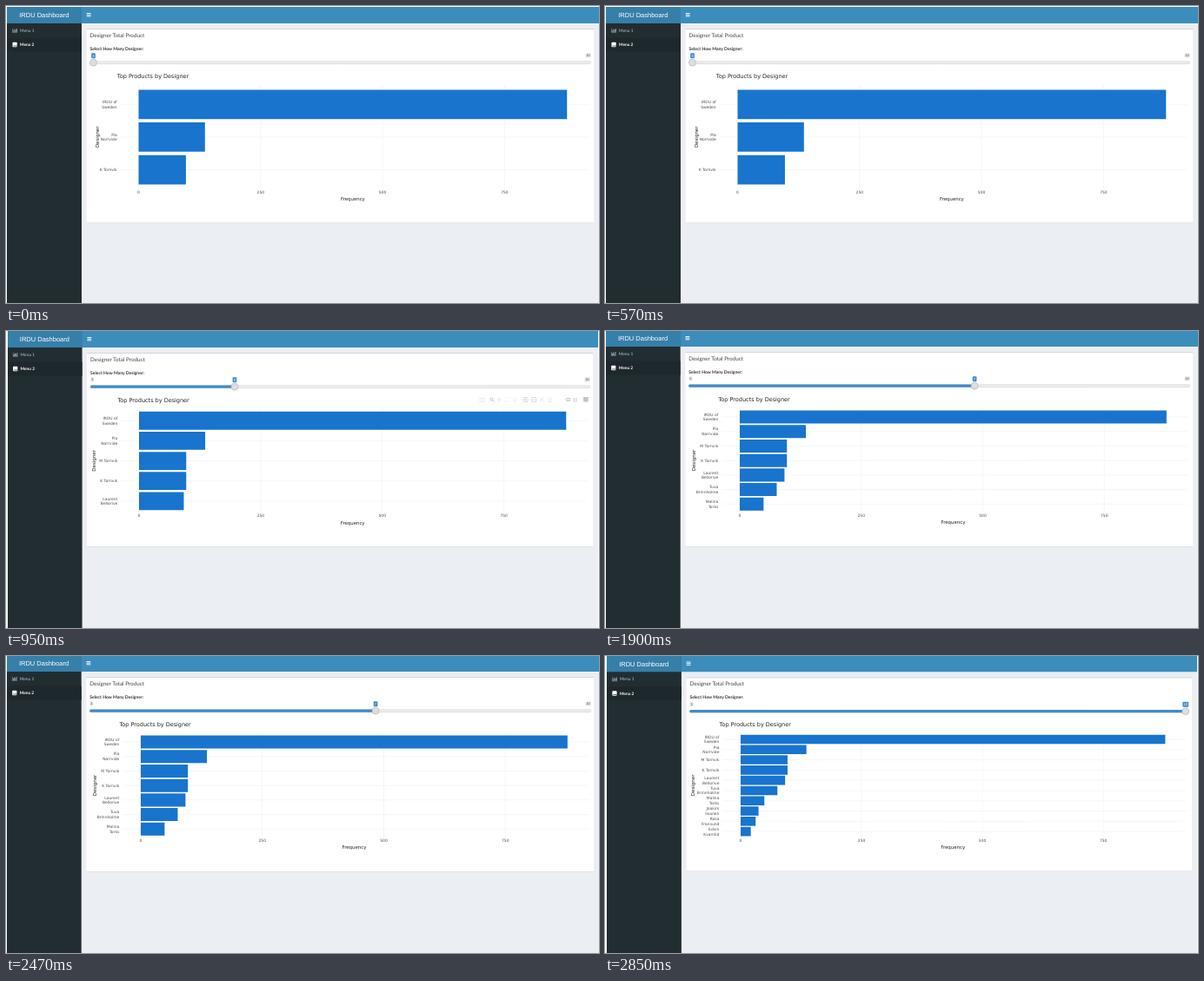
Write an HTML page with a canvas that moves like this. It is 682 by 342 pixels and loops after 3800 ms.

```html
<!DOCTYPE html>
<html lang="en">
<head>
<meta charset="utf-8">
<title>Dashboard</title>
<style>
html, body { margin: 0; width: 100%; height: 100%; overflow: hidden; background: #fff; }
canvas { display: block; width: 682px; height: 342px; }
</style>
</head>
<body>
<canvas id="stage"></canvas>
<script>
const W = 682, H = 342, STEP = 950;
const canvas = document.getElementById('stage');
const ctx = canvas.getContext('2d');
const ratio = window.devicePixelRatio || 1;
canvas.width = W * ratio;
canvas.height = H * ratio;

const UI = 'Lato, sans-serif';
const PLOT = '"DejaVu Sans", sans-serif';
const LOGO = '"Liberation Sans", Arial, sans-serif';

const designers = [
  ['IRDU of|Sweden', 878], ['Pia|Norrvide', 136], ['M Tornvik', 97], ['K Tornvik', 97],
  ['Laurent|Bellorive', 92], ['Tuva|Brinnholme', 76], ['Malina|Torks', 49],
  ['Joakim|Ilvanen', 37], ['Rosa|Fransund', 31], ['Edvin|Kvarnlid', 21]
];

// Each view is a slightly shifted screen with its own slider value n.
const views = [
  { n: 3,  left: 1, right: 682, top: 1, dx: 0,    dy: 0,    navBottom: 20,   boxBottom: 249.5, zero: 152.5, unit: .5612, plotTop: 90.8, axisX: 105 },
  { n: 5,  left: 2, right: 681, top: 0, dx: .6,   dy: -1,   navBottom: 19,   boxBottom: 248,   zero: 153,   unit: .5595, plotTop: 89.4, axisX: 101.5, tools: true },
  { n: 7,  left: 1, right: 682, top: 0, dx: -.3,  dy: -2,   navBottom: 18,   boxBottom: 248,   zero: 155,   unit: .5590, plotTop: 89,   axisX: 102.5 },
  { n: 10, left: 2, right: 681, top: 0, dx: .9,   dy: -1.5, navBottom: 18.3, boxBottom: 247.5, zero: 156,   unit: .5562, plotTop: 88.9, axisX: 101 }
];

// Toolbar icons on a 5 x 5 grid: [x, path, opacity].
const tools = [
  [545, 'M0 1h5v4H0zM2 3h1', .12],
  [556.5, 'M3.5 2a1.5 1.5 0 1 1-3 0a1.5 1.5 0 1 1 3 0M3 3l2 2', .35],
  [564.5, 'M2.5 0v5M0 2.5h5', .12],
  [573.5, 'M0 0h1M2 0h1M4 0h1M0 5h1M2 5h1M4 5h1', .12],
  [583, 'M4.5 2a2 1.5 0 1 1-4 0a2 1.5 0 1 1 4 0M1 3v2', .1],
  [595, 'M0 0h5v5H0zM2.5 1v3M1 2.5h3', .22],
  [604.5, 'M0 0h5v5H0zM1 2.5h3', .22],
  [613.5, 'M0 0l5 5M5 0l-5 5', .14],
  [623, 'M0 2.5L2.5 0L5 2.5M1 2.5V5h3V2.5', .14],
  [643.5, 'M0 2.5l1.5-1.5h3.5v3h-3.5zM2 2.5h2', .35],
  [652.5, 'M0 1h4v1.5H0zM0 3.5h4V5H0z', .18]
].map(([x, path, alpha]) => [x, new Path2D(path), alpha]);

function rect(x, y, w, h, fill, radius = 0, stroke) {
  ctx.beginPath();
  ctx.roundRect(x, y, w, h, radius);
  ctx.fillStyle = fill;
  ctx.fill();
  if (stroke) {
    ctx.strokeStyle = stroke;
    ctx.lineWidth = .5;
    ctx.stroke();
  }
}

// y is the middle of the capital letters.
function text(str, x, y, size, family, fill, align = 'left', weight = 400) {
  ctx.font = `${weight} ${size}px ${family}`;
  ctx.textAlign = align;
  ctx.fillStyle = fill;
  ctx.fillText(str, x, y + size * .36);
}

function line(x1, y1, x2, y2, color, width) {
  ctx.beginPath();
  ctx.moveTo(x1, y1);
  ctx.lineTo(x2, y2);
  ctx.strokeStyle = color;
  ctx.lineWidth = width;
  ctx.stroke();
}

function drawFrame(v) {
  const { left, right, top, dx, dy } = v;
  const side = 87 + dx;
  rect(left, top, right - left, H - top, '#ebeef3');
  rect(left, top, side - left, H - top, '#222d32');
  rect(side, top, right - side, v.navBottom - top, '#3c8dbc');
  rect(left, top, side - left, v.navBottom - top, '#367fa9');
  text('IRDU Dashboard', 43.8 + dx, 10.3 + dy, 7.5, LOGO, '#fff', 'center');
  for (let i = 0; i < 3; i++) rect(92.8 + dx, 8 + dy + i * 1.7, 4.8, .9, '#fff');

  rect(left, 36.5 + dy, side - left, 16.3, '#1e282c');
  const x = 7.5 + dx, y = 25.8 + dy;
  line(x + .2, y, x + .2, y + 4.6, '#b8c7ce', .5);
  line(x, y + 4.5, x + 5.6, y + 4.5, '#b8c7ce', .5);
  [1.8, 3.2, 2.4, 3.8].forEach((h, i) => rect(x + 1 + i * 1.15, y + 4 - h, .75, h, '#b8c7ce'));
  text('Menu 1', 16 + dx, 28.1 + dy, 4.9, UI, '#b8c7ce');
  rect(x, 41.8 + dy, 5.2, 5.4, '#fff', .8);
  rect(x + 1, 45.6 + dy, 4.2, .7, '#1e282c');
  text('Menu 2', 16 + dx, 44.6 + dy, 4.8, UI, '#fff', 'left', 700);

  const boxX = 92.5 + dx, boxW = right - 5.6 - boxX, boxY = 26 + dy;
  rect(boxX, boxY, boxW, v.boxBottom - boxY + .4, '#d3d6db', 1);
  rect(boxX, boxY, boxW, v.boxBottom - boxY, '#fff', 1);
  rect(boxX, boxY, boxW, 1, '#d2d6de', .5);
  text('Designer Total Product', 96.5 + dx, 33.7 + dy, 6.3, UI, '#444');
  text('Select How Many Designer:', 96.5 + dx, 49.1 + dy, 5.05, UI, '#333', 'left', 700);
}

function tag(str, x, y, active) {
  const w = str.length * 2.1 + (active ? 2.6 : 1.8), h = active ? 6 : 5;
  rect(x - w / 2, y - h / 2, w, h, active ? '#428bca' : '#e3e3e3', 1);
  text(str, x, y, active ? 4.3 : 3.8, LOGO, active ? '#fff' : '#555', 'center');
}

function drawSlider({ n, right, dx, dy }) {
  const x1 = 96.5 + dx, x2 = right - 9.3, y = 65.2 + dy;
  const knob = x1 + 4 + (x2 - x1 - 8) * (n - 3) / 7;
  rect(x1, y - 1.4, x2 - x1, 2.8, '#eee', 1.4, '#c8c8c8');
  if (n > 3) rect(x1, y - 1.6, knob - x1, 3.2, '#428bca', 1.4);
  if (n > 3) tag('3', x1 + 2.2, y - 8.2);
  if (n < 10) tag('10', x2 - 3.2, y - 8.2);
  tag(String(n), knob, y - 8, true);
  rect(knob - 4, y - 4, 8, 8, '#dedede', 4, '#a8a8a8');
}

function drawChart({ n, zero, unit, plotTop, axisX, dy }) {
  const height = 120.3, pitch = height / (n + .2);
  const rows = designers.filter((d, i) => n > 3 || i !== 2).slice(0, n);
  const pad = 878 * .05 * unit;
  const x1 = zero - pad, x2 = zero + 878 * unit + pad;
  const rowY = i => plotTop + (i + .6) * pitch;

  text('Top Products by Designer', x1, 80.5 + dy, 6.5, PLOT, '#222');
  for (let value = 0; value <= 750; value += 250) {
    const x = zero + value * unit;
    line(x, plotTop, x, plotTop + height, '#ececec', .5);
    text(value, x, plotTop + 123.2, 4.45, PLOT, '#4d4d4d', 'center');
  }
  rows.forEach(([name, count], i) => {
    const y = rowY(i), lines = name.split('|');
    line(x1 + 4, y, x2, y, '#ececec', .5);
    rect(zero, y - pitch * .45, count * unit, pitch * .9, '#1874cd');
    lines.forEach((part, k) =>
      text(part, x1 - .2, y + (k - (lines.length - 1) / 2) * 5.7, 4.45, PLOT, '#4d4d4d', 'right'));
  });
  text('Frequency', (x1 + x2) / 2, plotTop + 131.2, 5.4, PLOT, '#222', 'center');
  ctx.save();
  ctx.translate(axisX, plotTop + 60);
  ctx.rotate(-Math.PI / 2);
  text('Designer', 0, 0, 5.5, PLOT, '#222', 'center');
  ctx.restore();
}

function drawTools() {
  for (const [x, path, alpha] of tools) {
    ctx.save();
    ctx.translate(x, 76.5);
    ctx.strokeStyle = `rgba(68, 68, 68, ${alpha})`;
    ctx.lineWidth = .8;
    ctx.stroke(path);
    ctx.restore();
  }
  rect(664, 76, 5.6, 5.6, '#c3c5cb');
}

function render() {
  const view = views[Math.floor(performance.now() / STEP) % views.length];
  ctx.setTransform(ratio, 0, 0, ratio, 0, 0);
  ctx.textRendering = 'geometricPrecision';
  ctx.clearRect(0, 0, W, H);
  drawFrame(view);
  drawSlider(view);
  drawChart(view);
  if (view.tools) drawTools();
  requestAnimationFrame(render);
}
render();
</script>
</body>
</html>
```
